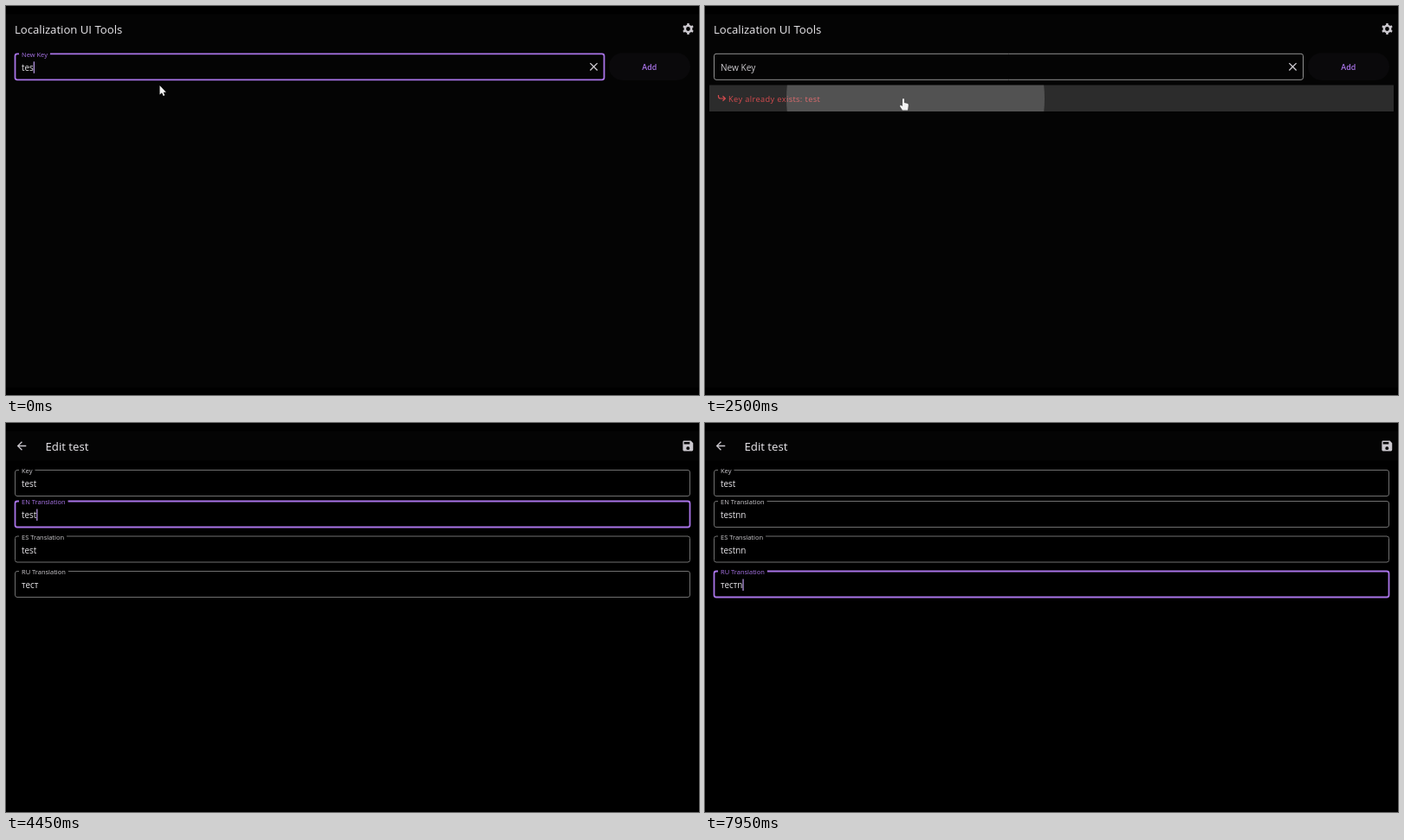
Recreate the animation shown at these times as an HTML page with a canvas. Size 800 by 450 pixels, loop 8 s.

```html
<!DOCTYPE html>
<html lang="en">
<head>
<meta charset="utf-8">
<title>Localization UI Tools</title>
<style>
  html, body { margin: 0; width: 100%; height: 100%; overflow: hidden; background: #000; }
  canvas { display: block; }
</style>
</head>
<body>
<canvas id="stage" width="800" height="450"></canvas>
<script>
const ctx = document.getElementById('stage').getContext('2d');
const LOOP = 8000;
const PURPLE = [169, 116, 232], GREY = [112, 112, 112], LIGHT = [205, 203, 207], WHITE = [238, 238, 238];

const ICONS = {
  back: new Path2D('M20 11H7.83l5.59-5.59L12 4l-8 8 8 8 1.41-1.41L7.83 13H20z'),
  close: new Path2D('M19 6.41L17.59 5 12 10.59 6.41 5 5 6.41 10.59 12 5 17.59 6.41 19 12 13.41 17.59 19 19 17.59 13.41 12z'),
  save: new Path2D('M17 3H5a2 2 0 0 0-2 2v14a2 2 0 0 0 2 2h14a2 2 0 0 0 2-2V7zm-5 16a3 3 0 1 1 0-6 3 3 0 0 1 0 6zm3-10H5V5h10z'),
  gear: gearPath(),
  arrow: new Path2D('M0 0V10.6L2.5 8.3 4.1 12 5.8 11.2 4.2 7.7H7.3Z'),
  hand: new Path2D('M-1 .8Q0-.6 1 .8V5L5 6Q6 6.4 5.8 8L5 13.5H-1L-3.8 9.2Q-4 7.6-2.6 7.9L-1 9Z')
};

// time, x, y of the pointer tip
const POINTER = [
  [0, 177.5, 92], [250, 177.5, 92], [550, 420, 112], [850, 738, 112], [1000, 757.5, 70.5],
  [1720, 757.5, 70.5], [2150, 229, 107], [3100, 229, 107], [3300, 215, 72], [4110, 215, 72],
  [4160, 200, 105], [5850, 200, 105], [6300, 200, 147], [7030, 200, 147], [7180, 198, 204],
  [7270, 198, 204], [7350, 198, 187], [LOOP, 198, 187]
];

const clamp = v => Math.max(0, Math.min(1, v));
const ramp = (t, from, to) => { const p = clamp((t - from) / (to - from)); return p * p * (3 - 2 * p); };
const lerp = (a, b, p) => a + (b - a) * p;
const mix = (a, b, p) => a.map((v, i) => lerp(v, b[i], p));
const rgb = c => `rgb(${c.map(Math.round)})`;
const inside = (p, x, y, w, h) => p.x >= x && p.x <= x + w && p.y >= y && p.y <= y + h;

function gearPath() {
  const path = new Path2D();
  for (let i = 0; i < 24; i++) {
    const angle = (Math.floor(i / 4) + [-.26, -.17, .17, .26][i % 4]) * Math.PI / 3 - Math.PI / 2;
    const r = i % 4 === 1 || i % 4 === 2 ? 10 : 7.6;
    path.lineTo(12 + r * Math.cos(angle), 12 + r * Math.sin(angle));
  }
  path.closePath();
  path.moveTo(15.6, 12);
  path.arc(12, 12, 3.6, 0, 2 * Math.PI);
  return path;
}

function shape(path, x, y, scale, color) {
  ctx.save();
  ctx.translate(x, y);
  ctx.scale(scale, scale);
  ctx.fillStyle = color;
  ctx.fill(path, 'evenodd');
  ctx.restore();
}

const icon = (name, cx, cy, scale = .66) => shape(ICONS[name], cx - 12 * scale, cy - 12 * scale, scale, '#cbc8ce');

function font(size, weight = 400, spacing = 0) {
  ctx.font = `${weight} ${size}px "Open Sans", "Noto Sans", sans-serif`;
  ctx.letterSpacing = spacing + 'px';
}

function text(str, x, y, size, color, weight, spacing) {
  font(size, weight, spacing);
  ctx.fillStyle = color;
  ctx.fillText(str, x, y);
  return ctx.measureText(str).width;
}

function rect(x, y, w, h, color) {
  ctx.fillStyle = color;
  ctx.fillRect(x, y, w, h);
}

function field(y, w, label, value, { focus = 0, hover = false, float = 1, caret = false, base = GREY }) {
  const x = 10.5, h = 30;
  const border = mix(hover ? WHITE : base, PURPLE, focus);
  ctx.beginPath();
  ctx.roundRect(x, y, w, h, 2.5);
  ctx.strokeStyle = rgb(border);
  ctx.lineWidth = 1 + .8 * focus;
  ctx.stroke();

  const size = lerp(10.1, 7.5, float);
  font(size);
  if (float > 0) rect(15, y - 1.5, (ctx.measureText(label).width + 6) * float, 3, '#020202');
  text(label, 18, y + lerp(19.5, 3.5, float), size, rgb(mix(hover ? WHITE : LIGHT, PURPLE, focus)));
  const width = text(value, 18, y + 19.5, 9.9, '#e8e6ea');
  if (caret) rect(18 + width, y + 9, 1.2, 13.5, '#bd9cec');
}

function listPage(t, pointer) {
  rect(0, 9.5, 800, 432, '#040404');
  text('Localization UI Tools', 10, 31.8, 13.15, '#eceaee');
  icon('gear', 787.5, 26.5);

  const focus = 1 - ramp(t, 1250, 1400);
  const value = t >= 1250 ? '' : t >= 100 ? 'test' : 'tes';
  field(55.3, 680, 'New Key', value, { focus, float: focus, caret: t < 1250, base: [145, 145, 145] });
  icon('close', 678.5, 70.3);

  const overButton = inside(pointer, 696, 54, 94, 32);
  ctx.beginPath();
  ctx.roundRect(696, 54.3, 94, 31.7, 15.8);
  ctx.fillStyle = overButton ? '#221b2b' : '#0a090b';
  ctx.fill();
  text('Add', 734.3, 74.2, 8.9, rgb(PURPLE), 600);

  if (t >= 1350) errorRow(t, pointer);
  return overButton;
}

function errorRow(t, pointer) {
  const red = `rgba(205,40,44,${ramp(t, 1350, 1500)})`;
  ctx.strokeStyle = red;
  ctx.lineWidth = 1.2;
  ctx.stroke(new Path2D('M15.5 103V104.5Q15.5 107 18 107H23M20.5 104.2L23.4 107 20.5 109.8'));
  text('Key already exists: test', 27, 110.8, 9.2, red, 400, .4);

  if (!inside(pointer, 5, 91.5, 790, 30.5)) return;
  const shade = lerp(.04, .16, ramp(t, 2340, 2400));
  rect(5, 91.5, 790, 30.5, `rgba(255,255,255,${shade})`);
  if (t < 2400) return;
  const grow = (t - 2400) / 300;
  ctx.save();
  ctx.beginPath();
  ctx.rect(5, 91.5, 790, 30.5);
  ctx.clip();
  ctx.beginPath();
  ctx.arc(229 + 42 * grow, 107, 20 + 387 * grow, 0, 2 * Math.PI);
  ctx.fillStyle = `rgba(255,255,255,${.18 * clamp((t - 2390) / 75)})`;
  ctx.fill();
  ctx.restore();
}

function editPage(t, pointer) {
  rect(0, 0, 800, 450, '#000');
  rect(0, 9.5, 800, 34, '#040404');
  icon('back', 18, 26.5);
  text('Edit test', 45.5, 31.8, 13.2, '#eceaee');
  icon('save', 787.3, 26.5);

  const typed = (...times) => 'n'.repeat(times.filter(at => t >= at).length);
  const rows = [
    { y: 54.5, label: 'Key', value: 'test', on: 3700, off: 4160 },
    { y: 90.5, label: 'EN Translation', value: 'test' + typed(5350, 5450), on: 4160, off: 6590 },
    { y: 131, label: 'ES Translation', value: 'test' + typed(6900, 7050), on: 6590, off: 7350 },
    { y: 171.5, label: 'RU Translation', value: 'тест' + typed(7950), on: 7350, off: LOOP + 1 }
  ];
  let overField = false;
  for (const { y, label, value, on, off } of rows) {
    const hover = inside(pointer, 10, y, 780, 30);
    const focus = ramp(t, on, on + 150) - ramp(t, off, off + 150);
    const blinkOff = t >= 4850 && t < 5350;
    overField ||= hover;
    field(y, 779, label, value, { focus, hover, caret: t >= on && t < off && !blinkOff });
  }
  return overField;
}

function pointerAt(t) {
  const i = Math.max(1, POINTER.findIndex(k => k[0] > t));
  const [t0, x0, y0] = POINTER[i - 1], [t1, x1, y1] = POINTER[i];
  const p = ramp(t, t0, t1);
  return { x: lerp(x0, x1, p), y: lerp(y0, y1, p) };
}

function draw(now) {
  const t = now % LOOP;
  const pointer = pointerAt(t);
  const fade = ramp(t, 2600, 2900);
  let shapeName = 'arrow';

  ctx.globalAlpha = 1;
  rect(0, 0, 800, 450, '#000');
  if (fade < 1) {
    const overButton = listPage(t, pointer);
    const overRow = t >= 1350 && inside(pointer, 5, 91.5, 790, 30.5);
    if (overButton || overRow) shapeName = 'hand';
  }
  if (fade > 0) {
    ctx.globalAlpha = fade;
    const overField = editPage(t, pointer);
    ctx.globalAlpha = 1;
    // the text pointer is invisible over fields
    if (overField && fade > .5) shapeName = '';
  }
  if (shapeName) shape(ICONS[shapeName], pointer.x, pointer.y, 1, '#f4f4f4');
  requestAnimationFrame(tick);
}

let start;
function tick(now) {
  start ??= now;
  draw(now - start);
}
requestAnimationFrame(tick);
</script>
</body>
</html>
```
